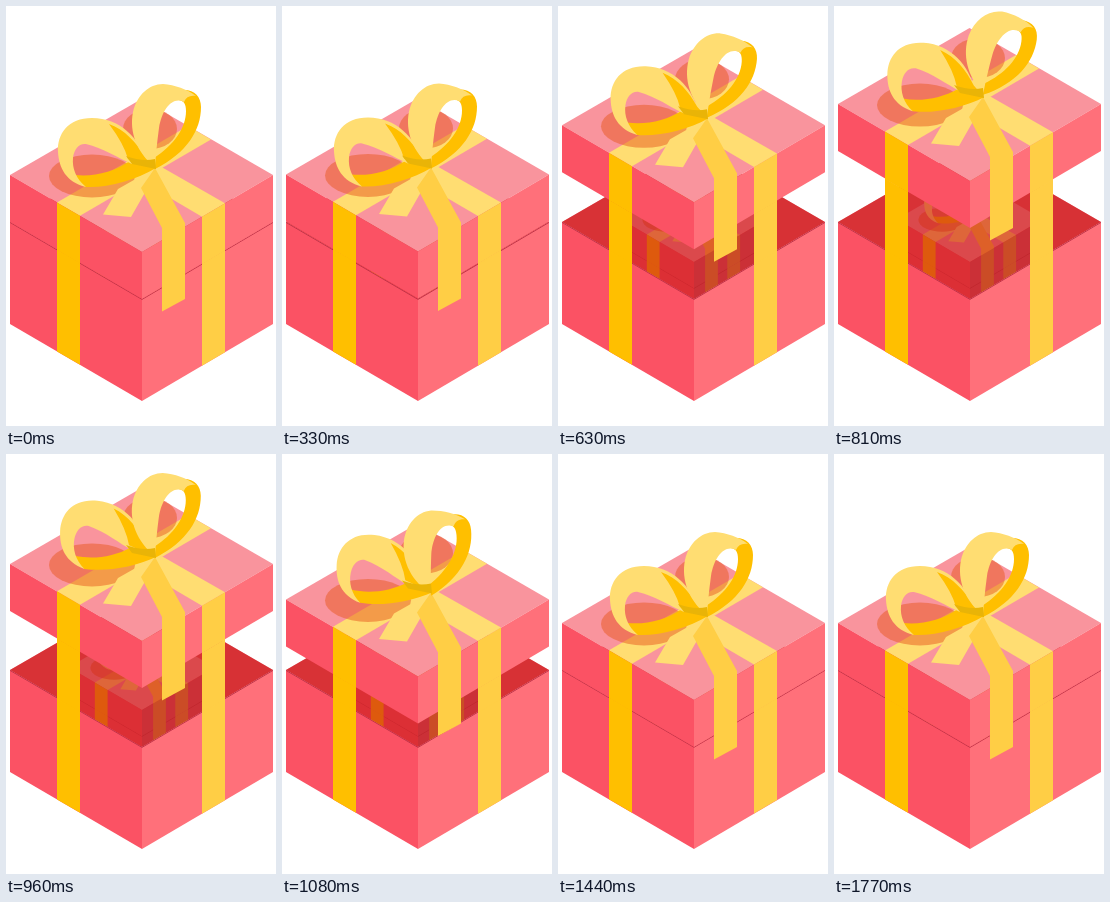
An HTML page that plays this animation: 270x420 px, repeating every 1.8 s.

```html
<!DOCTYPE html>
<html lang="en">
<head>
<meta charset="utf-8">
<title>Gift box</title>
<style>
  html, body { margin: 0; width: 100%; height: 100%; overflow: hidden; background: #fff; }
  svg { display: block; width: 270px; height: 420px; }
  .side { fill: #fb5264; }
  .face { fill: #ff707a; }
  .top { fill: #f9949d; }
  .gold { fill: #ffbf00; }
  .amber { fill: #ffce45; }
  .light { fill: #ffdd72; }
  .shade { fill: #e75a21; opacity: .5; }
</style>
</head>
<body>
<svg viewBox="0 0 270 420">
  <g id="box">
    <!-- inside of the box, with a smaller gift in its shade -->
    <path fill="#f05a66" d="M4 216 135.5 140V293Z"/>
    <path fill="#ee5864" d="M267 216 135.5 140V293Z"/>
    <g transform="translate(136 256) scale(.555) translate(-136 -246)">
      <use href="#base"/><use href="#lid"/>
    </g>
    <path fill="#c81816" opacity=".6" d="M4 216 135.5 140 267 216 136 293Z"/>
    <path fill="#901020" opacity=".25" d="M136 256 209 213.3V250L136 293Z"/>

    <g id="base">
      <path class="side" d="M4 216 136 293V395L4 318Z"/>
      <path class="face" d="M136 293 267 216V318L136 395Z"/>
      <path fill="none" stroke="#c23348" d="M4 216.4 136 293.4 267 216.4"/>
      <path class="gold" d="M51 243.4 74 256.8V358.8L51 345.4Z"/>
      <path class="amber" d="M196 257.7 219 244.2V346.2L196 359.7Z"/>
    </g>
    <path id="strapL" class="gold"/>
    <path id="strapR" class="amber"/>

    <g id="lidMove">
      <g id="lid">
        <path class="top" d="M4 169 135.5 93 267 169 136 246Z"/>
        <path class="side" d="M4 169 136 246V293L4 216Z"/>
        <path class="face" d="M136 246 267 169V216L136 293Z"/>

        <!-- straps -->
        <path class="light" d="M51 196.4 182 120 205 133.4 74 209.8Z"/>
        <path class="light" d="M130 172 152 159 219 197.2 196 210.7Z"/>
        <path class="gold" d="M51 196.4 74 209.8V257.5L51 244Z"/>
        <path class="amber" d="M196 210.7 219 197.2V244.8L196 258.3Z"/>

        <ellipse class="shade" cx="86" cy="170" rx="43" ry="21.5"/>
        <ellipse class="shade" cx="144" cy="123" rx="27" ry="20"/>

        <!-- tails -->
        <path class="light" d="M149 162 112 183 97 208.5 125 211 137 190 149 170Z"/>
        <path class="amber" d="M149 162 179 217V293L156 305.5V222L135 182Z"/>

        <g id="loopL">
          <path class="gold" d="M69 169C88 171 108 166 124 155L150 162C130 174 102 182 80 181C74 179 70 175 69 169Z"/>
          <path class="light" d="M140 155C133 132 114 112 86 112C62 112 51 128 52 146C53 162 60 176 80 181C70 173 66 162 67 152C68 143 73 137 80 138C97 142 112 152 126 158Z"/>
          <path class="gold" d="M103 118C119 124 130 136 139 151L150 162 122 153Q118 138 103 118Z"/>
        </g>
        <g id="loopR">
          <path class="gold" d="M178 84C189 84 195 91 195 101C195 124 181 147 149 163L148 152C168 139 180 122 180 105C180 98 178 95 173 94Z"/>
          <path class="light" d="M149 161C131 147 123 126 127 106C131 89 143 78 157 78C169 79 181 83 190 90C184 89 180 91 178 96C166 90 156 104 153 122C151 137 150 148 149 161Z"/>
        </g>
        <path fill="#e9b407" d="M120 150Q136 156 149 153L150 163 126 158Z"/>
      </g>
    </g>
  </g>
</svg>
<script>
const LOOP = 1800;
const $ = id => document.getElementById(id);

const ease = {
  inOut: p => (1 - Math.cos(Math.PI * p)) / 2,
  in: p => p * p,
  out: p => p * (2 - p)
};

// Each step: time, value, easing towards that value
const tracks = {
  lift: [[300, 0], [825, -71, 'inOut'], [840, -71], [1135, 0, 'in']],
  drop: [[1135, 0], [1200, 17.5, 'out'], [1300, -12.5, 'inOut'], [1500, 3, 'inOut'], [1770, 0, 'inOut']],
  left: [[450, 0], [810, 4, 'inOut'], [1080, 7, 'inOut'], [1290, 1, 'inOut'], [1440, 0, 'inOut']],
  right: [[450, 0], [810, 7.5, 'inOut'], [1080, -5.5, 'inOut'], [1290, 0, 'inOut']]
};

function valueAt(steps, t) {
  let [t0, v0] = steps[0];
  for (const [t1, v1, kind] of steps) {
    if (t < t1) {
      if (t <= t0) return v0;
      const p = (t - t0) / (t1 - t0);
      return v0 + (v1 - v0) * (kind ? ease[kind](p) : p);
    }
    [t0, v0] = [t1, v1];
  }
  return v0;
}

const move = (id, value) => $(id).setAttribute('transform', value);

// Strap stretched across the gap between lid and box
const strap = (id, x, yA, yB, lift) =>
  $(id).setAttribute('d', `M${x} ${yA + lift}L${x + 23} ${yB + lift}V${yB + 1}L${x} ${yA + 1}Z`);

function draw(now) {
  const t = now % LOOP;
  const lift = valueAt(tracks.lift, t);

  move('box', `translate(0 ${valueAt(tracks.drop, t)})`);
  move('lidMove', `translate(0 ${lift})`);
  move('loopL', `rotate(${valueAt(tracks.left, t)} 149 162)`);
  move('loopR', `rotate(${valueAt(tracks.right, t)} 174 162)`);
  strap('strapL', 51, 243.4, 256.8, lift);
  strap('strapR', 196, 257.7, 244.2, lift);
}

const start = performance.now();
function tick() {
  draw(performance.now() - start);
  requestAnimationFrame(tick);
}
tick();
</script>
</body>
</html>
```
